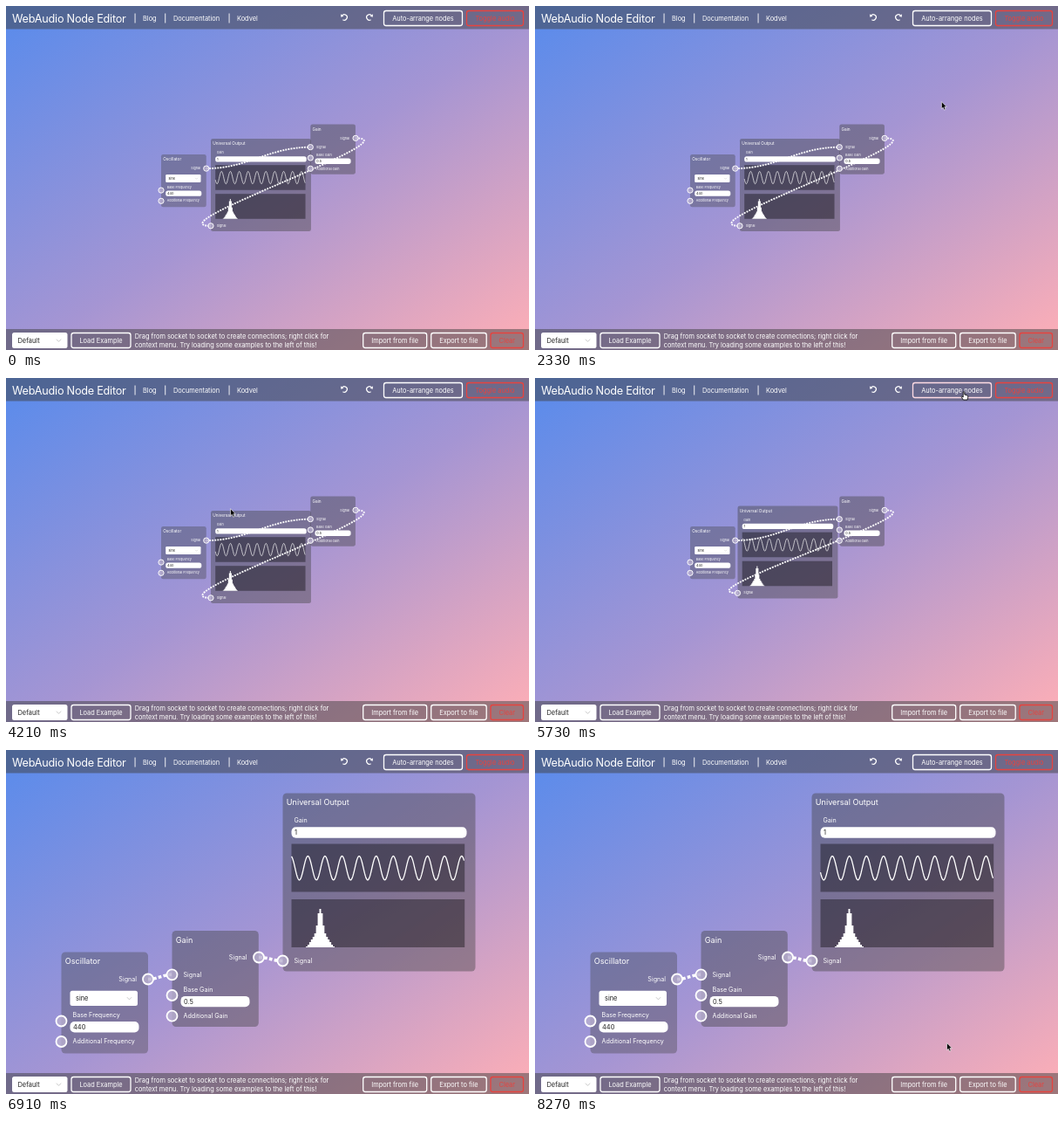
An HTML page that plays this animation: 600x394 px, repeating every 8300 ms.

```html
<!DOCTYPE html>
<html lang="en">
<head>
<meta charset="utf-8">
<title>WebAudio Node Editor</title>
<style>
  html, body { margin: 0; width: 100%; height: 100%; overflow: hidden; }
  body { background: linear-gradient(to bottom right, #588bec, #a595d3 52%, #ffafb6); }
  svg { display: block; width: 600px; height: 394px; }
  text { font: 7.4px Inter, "Open Sans", sans-serif; fill: #fff; }
  .brand { font-size: 12.7px; letter-spacing: -.02em; }
  .name { font-size: 9.1px; }
  .label { font-size: 7.15px; }
  .dark { fill: #222; }
  .red { fill: #e6433f; }
  .end { text-anchor: end; }
  .mid { text-anchor: middle; }
  .bar { fill: rgba(64, 64, 64, .5); }
  .node { fill: rgba(64, 64, 64, .42); }
  #osc .node { fill: rgba(64, 64, 64, .36); }
  .screen { fill: rgba(0, 0, 0, .38); }
  .line { fill: none; stroke: #fff; stroke-width: 1.3; }
  .button { fill: none; stroke: #fff; stroke-width: 1.3; }
  .button.warn { stroke: #e6433f; }
  .button.hover { stroke: #ffdce4; }
  .white { fill: #fff; }
  .chevron { fill: none; stroke: #bbb; stroke-width: .8; }
  .pin { fill: rgba(185, 176, 208, .8); stroke: #fff; stroke-width: 1.8; }
  .wire { fill: none; stroke: #fff; stroke-width: 3.6; stroke-dasharray: 3.7 2.3; }
</style>
</head>
<body>
<svg viewBox="0 0 600 394">
  <g id="chrome"></g>
  <g id="world">
    <g id="bodies"></g>
    <g id="wires"></g>
    <g id="pins"></g>
  </g>
  <g id="cursor">
    <path id="arrow" d="M0 0V8.2L1.8 6.6L3.1 9.5L4.6 8.9L3.4 6H5.8Z" fill="#000" stroke="#fff" stroke-width=".6"/>
    <path id="hand" d="M-.8 0Q0-1 .8 0V3L4 4Q5 4.4 4.8 6L4 9H-.6L-3 5.6Q-2.8 4.4-.8 6Z" fill="#fff" stroke="#000" stroke-width=".8"/>
  </g>
</svg>
<script>
const LOOP = 8300, ARRANGE = 5850, SMALL = 0.52;
const $ = id => document.getElementById(id);

const text = (x, y, s, cls = '') => `<text x="${x}" y="${y}" class="${cls}">${s}</text>`;
const rect = (x, y, w, h, cls, r = 0) =>
  `<rect x="${x}" y="${y}" width="${w}" height="${h}" rx="${r}" class="${cls}"/>`;
const path = (d, cls, id = '') => `<path d="${d}" class="${cls}" id="${id}"/>`;
const chevron = (x, y) => path(`M${x - 2.6} ${y - 1.3}l2.6 2.7l2.6 -2.7`, 'chevron');
const button = (x, y, w, s, warn = false) =>
  rect(x, y, w, 17, 'button' + (warn ? ' warn' : ''), 2.5) +
  text(x + w / 2, y + 11.3, s, 'mid' + (warn ? ' red' : ''));
const field = (x, y, w, s) => rect(x, y, w, 12.4, 'white', 5) + text(x + 3.6, y + 9, s, 'dark');

// Toolbars
const turn = (x, dir) => `<g transform="translate(${x} 12.8) scale(${dir} 1)">` +
  path('M-2.6 -1.6A3.2 3.2 0 1 1 -1.6 2.9', 'line') +
  path('M-4 -3.6L-3.7 -.1L-.6 -1Z', 'white') + '</g>';

$('chrome').innerHTML =
  rect(0, 0, 600, 26.5, 'bar') + rect(0, 370, 600, 24, 'bar') +
  text(7, 19, 'WebAudio Node Editor', 'brand') +
  [148, 182.7, 256].map(x => rect(x - .4, 8.5, .9, 11, 'white')).join('') +
  text(157, 17, 'Blog') + text(192, 17, 'Documentation') + text(265, 17, 'Kodvel') +
  turn(388, 1) + turn(417, -1) +
  button(433.5, 5.5, 90, 'Auto-arrange nodes') + button(528.5, 5.5, 65, 'Toggle audio', true) +
  rect(7, 374, 63.5, 18, 'white', 2.5) + text(13.5, 385.8, 'Default', 'dark') + chevron(60.5, 383) +
  button(75, 374.5, 68, 'Load Example') +
  text(147.7, 381.3, 'Drag from socket to socket to create connections; right click for') +
  text(147.7, 390.5, 'context menu. Try loading some examples to the left of this!') +
  button(409.7, 374.5, 73, 'Import from file') + button(487.7, 374.5, 63.5, 'Export to file') +
  button(556, 374.5, 37.5, 'Clear', true);
const arrangeButton = document.querySelector('.button');

// Nodes
const peak = [1, 3, 6, 9, 12, 16, 25, 39, 44, 39, 25, 16, 12, 9, 6, 3, 1];
const spectrum = path('M26.5 176.5' + peak.map(h => `V${176.5 - h}h1.94`).join('') + 'V176.5Z', 'white');

const nodes = {
  osc: {
    title: 'Oscillator', w: 99.5, h: 116, small: [178, 170], big: [63.5, 231.5],
    pins: [[99.5, 31], [0, 79], [0, 102.5]],
    body: text(86.5, 33.3, 'Signal', 'label end') +
      rect(10, 44.3, 77.5, 17.2, 'white', 2.5) + text(16.5, 55.7, 'sine', 'dark') + chevron(78, 53) +
      text(13, 74.7, 'Base Frequency', 'label') + field(10, 79.6, 79, '440') +
      text(13, 104.7, 'Additional Frequency', 'label')
  },
  out: {
    title: 'Universal Output', w: 221, h: 204, small: [235, 152], big: [317.5, 49.5],
    pins: [[0, 192]],
    body: text(13, 33.5, 'Gain', 'label') + field(10, 38.8, 201, '1') +
      rect(10, 58, 198.7, 55, 'screen') + rect(10, 121.5, 198.7, 55, 'screen') +
      spectrum + path('', 'line', 'wave') + text(13, 194.2, 'Signal', 'label')
  },
  gain: {
    title: 'Gain', w: 99.3, h: 110, small: [349.3, 135.5], big: [190.5, 207],
    pins: [[99.5, 30.5], [0, 50.3], [0, 74], [0, 97.7]],
    body: text(86, 33, 'Signal', 'label end') + text(13, 52.8, 'Signal', 'label') +
      text(13, 69.7, 'Base Gain', 'label') + field(10, 74.9, 79, '0.5') +
      text(13, 100, 'Additional Gain', 'label')
  }
};
for (const [id, n] of Object.entries(nodes)) {
  $('bodies').innerHTML += `<g id="${id}">` + rect(0, 0, n.w, n.h, 'node', 4.5) +
    text(4.3, 13.5, n.title, 'name') + n.body + '</g>';
  $('pins').innerHTML += `<g id="${id}Pins">` +
    n.pins.map(([x, y]) => `<circle cx="${x}" cy="${y}" r="6" class="pin"/>`).join('') + '</g>';
}
$('wires').innerHTML = path('', 'wire', 'wireA') + path('', 'wire', 'wireB');

function pinAt(id, i) {
  const n = nodes[id];
  return [n.x + n.pins[i][0], n.y + n.pins[i][1]];
}

function wire(el, [x1, y1], [x2, y2]) {
  const bend = Math.max(Math.abs(y2 - y1) / 2, Math.abs(x2 - x1)) * 0.4;
  el.setAttribute('d', `M${x1} ${y1}C${x1 + bend} ${y1} ${x2 - bend} ${y2} ${x2} ${y2}`);
}

// Motion: [time, x, y]
const drag = [[4300, 0, 0], [4750, -2.5, -5.5]];
const enter = [
  [850, 604, 262], [1210, 513.5, 217.7], [1600, 508, 190], [2330, 466.4, 109.6], [2800, 420, 102],
  [3500, 300, 132], [4000, 257.5, 149.7], [4300, 257.5, 149.7], [4750, 255, 144.2], [4900, 258, 142],
  [5450, 486, 20], [5600, 492, 16], [6000, 492, 16], [6260, 498, -12]
];
const leave = [[7900, 446, 398], [8200, 472.5, 335.6], [8300, 472.5, 335.6]];

function along(steps, t) {
  const i = steps.findIndex(s => s[0] > t);
  if (i === 0) return steps[0].slice(1);
  if (i < 0) return steps[steps.length - 1].slice(1);
  const [t0, x0, y0] = steps[i - 1], [t1, x1, y1] = steps[i];
  const p = (t - t0) / (t1 - t0), e = p * p * (3 - 2 * p);
  return [x0 + (x1 - x0) * e, y0 + (y1 - y0) * e];
}

// The scope refreshes about every 30 ms, after a short stall at the start.
function tick(t) {
  if (t < 390) return Math.min(Math.floor(t / 30) * 30, 90);
  const step = 30.317, n = Math.floor((t - 385) / step);
  return Math.round((390 + n * step) / 10) * 10;
}

function drawWave(t) {
  const phase = 0.56 + t * 0.439903;
  let d = '';
  for (let x = 0; x <= 198.5; x += 0.75) {
    const y = 85.7 - 13.7 * Math.sin(2 * Math.PI * (x / 19.6 + phase));
    d += (x ? 'L' : 'M') + (10 + x).toFixed(2) + ' ' + y.toFixed(2);
  }
  $('wave').setAttribute('d', d);
}

function drawNodes(t) {
  const done = t >= ARRANGE, s = done ? 1 : SMALL;
  const [dx, dy] = along(drag, t);
  $('world').setAttribute('transform', `scale(${s})`);
  for (const [id, n] of Object.entries(nodes)) {
    const [x, y] = done ? n.big : n.small;
    const moved = !done && id === 'out';
    n.x = (x + (moved ? dx : 0)) / s;
    n.y = (y + (moved ? dy : 0)) / s;
    const move = `translate(${n.x} ${n.y})`;
    $(id).setAttribute('transform', move);
    $(id + 'Pins').setAttribute('transform', move);
  }
  wire($('wireA'), pinAt('osc', 0), pinAt('gain', 1));
  wire($('wireB'), pinAt('gain', 0), pinAt('out', 0));
}

function drawCursor(t) {
  const [x, y] = along(t < 7000 ? enter : leave, t);
  const over = x > 433 && x < 524 && y > 5 && y < 23;
  $('cursor').setAttribute('transform', `translate(${x} ${y})`);
  $('arrow').style.display = over ? 'none' : '';
  $('hand').style.display = over ? '' : 'none';
  arrangeButton.classList.toggle('hover', over);
}

function draw(now) {
  const t = now % LOOP;
  drawWave(tick(t));
  drawNodes(t);
  drawCursor(t);
}

const start = performance.now();
function frame() {
  draw(performance.now() - start);
  requestAnimationFrame(frame);
}
frame();
</script>
</body>
</html>
```
